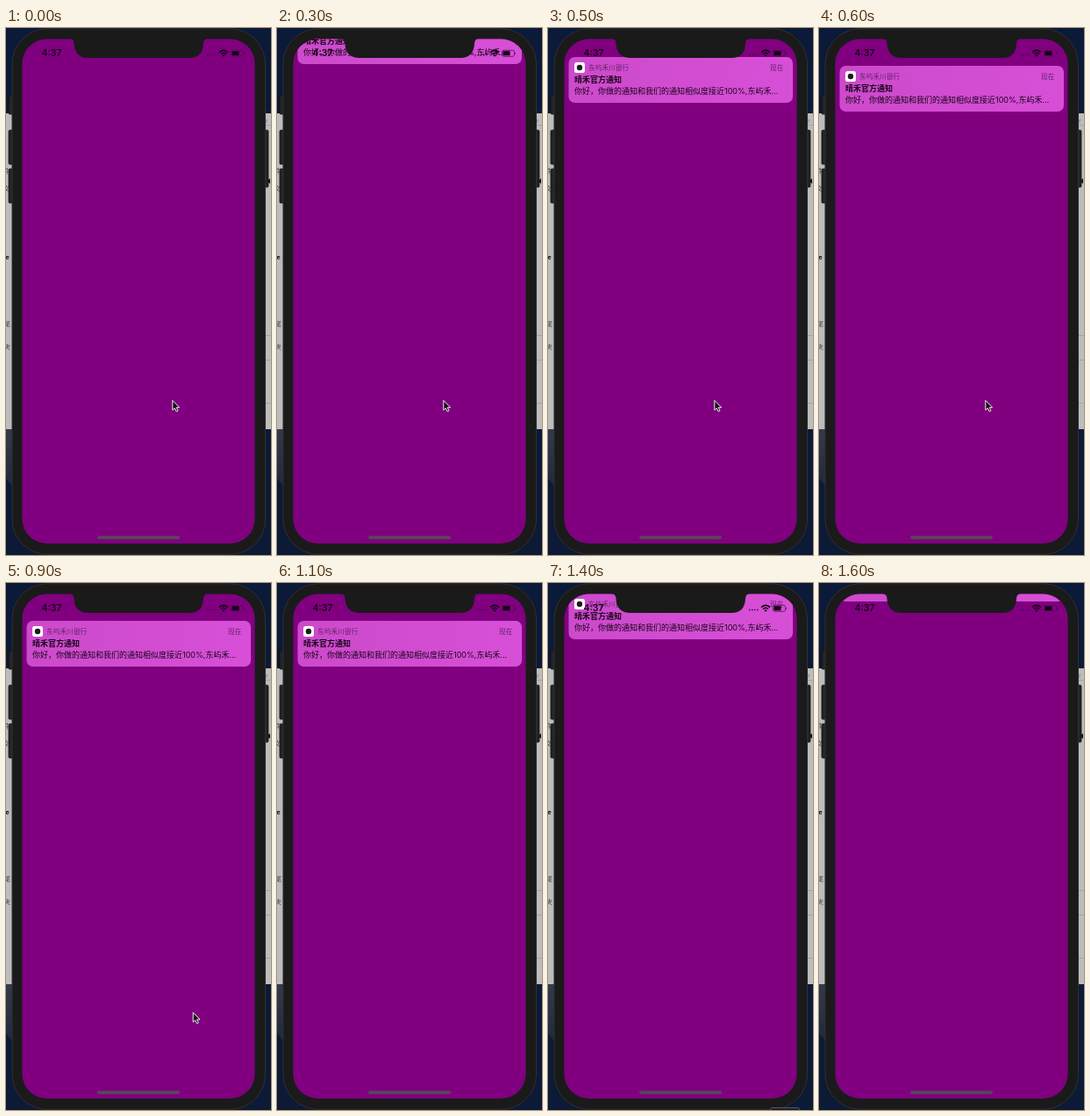
An HTML page for the animation above (1.7 s loop, 302 px wide and 599 px high).

```html
<!DOCTYPE html>
<html lang="zh-CN">
<head>
<meta charset="utf-8">
<title>Notification banner</title>
<style>
  html, body { margin: 0; height: 100%; overflow: hidden; background: #0b1832; }
  svg { display: block; font-family: Inter, "Noto Sans CJK SC", "Noto Sans CJK", sans-serif; }
</style>
</head>
<body>
<svg width="302" height="599" viewBox="0 0 302 599">
  <defs>
    <clipPath id="screen"><rect x="18.5" y="12.5" width="265" height="573.5" rx="28"/></clipPath>
    <linearGradient id="desk" x2="0" y2="1">
      <stop stop-color="#0a1a38"/><stop offset="1" stop-color="#0c1a36"/>
    </linearGradient>
    <linearGradient id="rock" x2="0" y2="1">
      <stop stop-color="#333a4a"/><stop offset="1" stop-color="#1a2438"/>
    </linearGradient>
    <linearGradient id="glass">
      <stop stop-color="#cc4acb"/><stop offset="1" stop-color="#d74fd7"/>
    </linearGradient>
  </defs>

  <!-- desktop and window behind the phone -->
  <rect width="302" height="599" fill="url(#desk)"/>
  <path d="M0 456H24V540L0 512Z" fill="url(#rock)"/>
  <rect y="97" width="302" height="359" fill="#bdbdbd"/>
  <path d="M290 110.5H302M290 349.5H302M290 377.5H302M290 426.5H302" stroke="#a4a4a4"/>
  <g font-size="7" fill="#444">
    <text x="-3" y="165">件</text>
    <text x="-3" y="185">文</text>
    <text x="-3" y="263" font-weight="700" fill="#111">te</text>
    <text x="-2" y="339">尾</text>
    <text x="-2" y="365">夹</text>
    <text x="296" y="108" fill="#777">r</text>
  </g>
  <path d="M301 171V177L297 174Z" fill="#111"/>

  <!-- phone body -->
  <g fill="#242424" stroke="#111" stroke-width=".7">
    <rect x="3" y="77" width="6" height="21" rx="1.5"/>
    <rect x="3" y="116" width="6" height="39" rx="1.5"/>
    <rect x="3" y="160" width="6" height="39" rx="1.5"/>
    <rect x="293" y="116" width="6" height="65" rx="1.5"/>
  </g>
  <rect x="7" y=".8" width="288.5" height="597.5" rx="40" fill="#1a1a1a" stroke="#303030"/>

  <g clip-path="url(#screen)">
    <rect x="18" y="12" width="266" height="575" fill="#800080"/>
    <g id="banner">
      <rect x="23.5" width="255.5" height="52" rx="7" fill="url(#glass)"/>
      <rect x="30" y="6" width="12" height="12" rx="2.5" fill="#fff"/>
      <circle cx="36" cy="12" r="3.2" fill="#1c1c1c"/>
      <g font-size="7.7" fill="#66226a">
        <text x="46" y="14.8">东屿禾川银行</text>
        <text x="253" y="14.8">现在</text>
      </g>
      <g font-size="9" fill="#1b051b">
        <text x="30" y="29.3" font-weight="700">晴禾官方通知</text>
        <text x="30" y="42.4">你好，你做的通知和我们的通知相似度接近100%,东屿禾…</text>
      </g>
    </g>

    <!-- status bar -->
    <text x="40.5" y="32.3" font-size="10.5" font-weight="600" fill="#170017">4:37</text>
    <path d="M229 30.5H240" stroke="#4d004d" stroke-width="1.5" stroke-dasharray="1.5 1.5"/>
    <g fill="none" stroke="#170017">
      <path d="M243 27.6Q248 23.2 253 27.6M244.9 29.6Q248 26.8 251.1 29.6" stroke-width="1.5"/>
      <rect x="256.5" y="25.3" width="14" height="7" rx="2" stroke="#551055" stroke-width=".8"/>
    </g>
    <path d="M246.3 31Q248 29.5 249.7 31L248 32.8ZM257.5 26.3H265.5V31.3H257.5ZM271.5 27.5Q272.8 28.8 271.5 30.1Z" fill="#170017"/>
    <rect x="104" y="577.3" width="94" height="3.6" rx="1.8" fill="#564856"/>
  </g>
  <path d="M72 12Q77.5 12.5 77.5 18Q78.5 34 94 34H209Q224 34 225 18Q225 12.5 230 12Z" fill="#1a1a1a"/>

  <rect id="dock" x="253.5" y="596.5" width="33" height="8" rx="2" fill="#1c1f26" stroke="#555a63"/>
  <path id="cursor" d="M0 0V11L2.5 8.8L4.3 12.6L6.2 11.7L4.4 8H7.8Z" fill="#111" stroke="#eee" stroke-width="1"/>
</svg>
<script>
  const LOOP = 1700, STEP = 100;
  const REST_Y = 43;
  // banner lift per step, away from rest
  const LIFT = [0, 10, 31, 54, 74, 90];
  const [banner, cursor, dock] = ["banner", "cursor", "dock"].map(id => document.getElementById(id));
  const clamp = (v, lo, hi) => Math.min(hi, Math.max(lo, v));
  const show = (el, on) => el.setAttribute("visibility", on ? "visible" : "hidden");
  const move = (el, x, y) => el.setAttribute("transform", `translate(${x} ${y})`);

  function draw(step) {
    const away = step < 6 ? 6 - step : step - 12;
    move(banner, 0, REST_Y - (step ? LIFT[clamp(away, 0, 5)] : 100));

    // the pointer leaves towards the bottom edge
    const out = clamp((step - 6) / 5, 0, 1) ** 2;
    move(cursor, 189.8 + 65 * out, 423.3 + 180 * out);
    show(cursor, out < 1);
    show(dock, step === 14);
  }

  function tick() {
    draw(Math.floor(performance.now() % LOOP / STEP));
    requestAnimationFrame(tick);
  }
  tick();
</script>
</body>
</html>
```
